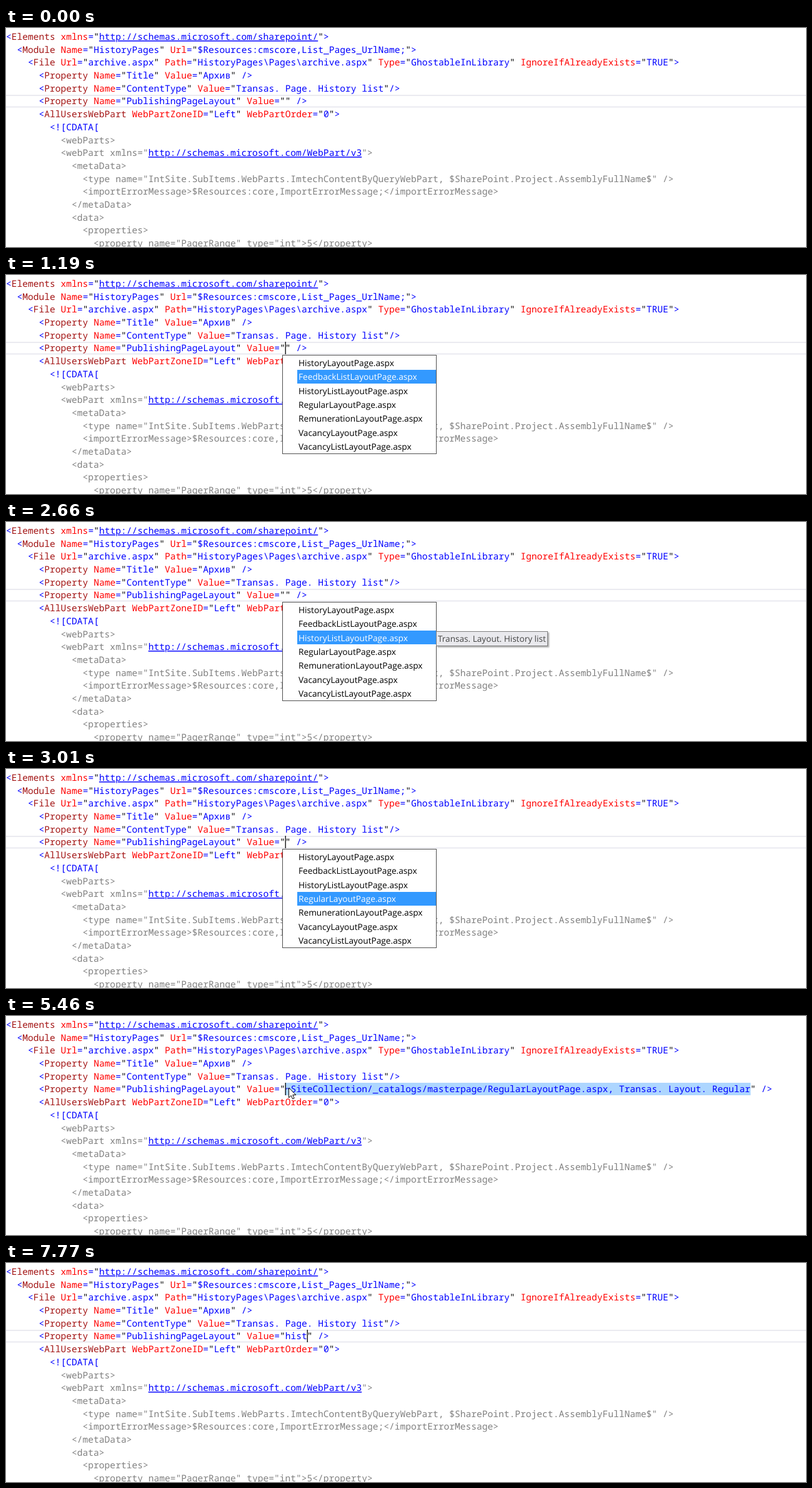
Write an HTML page that moves like this. It is 1280x351 px and loops after 8000 ms.

```html
<!DOCTYPE html>
<html lang="en">
<head>
<meta charset="utf-8">
<title>Layout completion</title>
<style>
  html, body { margin: 0; width: 100%; height: 100%; overflow: hidden; background: #fff; }
  svg { display: block; }
  text { white-space: pre; text-rendering: geometricPrecision; }
  #code { font: 14.6px "Noto Sans Mono", monospace; fill: #00f; }
  #popup, #tip { font: 13.7px "Open Sans", sans-serif; }
  #tip text { font-size: 13.6px; fill: #444; }
  #tip rect { fill: #e9e9ed; stroke: #808080; filter: drop-shadow(2px 2px 1px #0005); }
  .tag { fill: #a31515; }
  .attr { fill: #f00; }
  .quote { fill: #000; }
  .data { fill: #808080; }
  .link { fill: #00f; text-decoration: underline; text-decoration-thickness: 1.2px; text-underline-offset: 1.5px; }
</style>
</head>
<body>
<svg width="1280" height="351" viewBox="0 0 1280 351">
  <rect id="line" x="-5" y="108" width="1290" height="18.5" fill="none" stroke="#eaeaf0" stroke-width="2"/>
  <rect id="selection" y="107" height="20" fill="#add6ff"/>
  <g id="code"></g>
  <g id="popup">
    <rect x="442.5" y="128.5" width="246" height="158" fill="#fff" stroke="#505050"/>
    <rect id="mark" x="466" width="222" height="22" fill="#39f"/>
  </g>
  <g id="tip">
    <rect x="688.5" y="0.5" height="23"/>
    <text x="691" y="16.5"></text>
  </g>
  <rect id="caret" y="107" width="1.3" height="20"/>
  <path id="mouse" d="M0 0V16l3.7-3.5 2.4 5.4 2.6-1.1-2.4-5.3h5z" fill="#fff" stroke="#000"/>
</svg>
<script>
const CHAR = 8.76, LINE = 20.69, ROW = 22.3, LOOP = 8000, STEP = 70;
const FIRST = 51;   // column where the edited value begins
const $ = id => document.getElementById(id);

function add(parent, name, attrs, content = '') {
  const el = document.createElementNS('http://www.w3.org/2000/svg', name);
  set(el, attrs);
  el.textContent = content;
  return parent.appendChild(el);
}

function set(el, attrs) {
  for (const key in attrs) el.setAttribute(key, attrs[key]);
}

const code = String.raw`<Elements xmlns="http://schemas.microsoft.com/sharepoint/">
  <Module Name="HistoryPages" Url="$Resources:cmscore,List_Pages_UrlName;">
    <File Url="archive.aspx" Path="HistoryPages\Pages\archive.aspx" Type="GhostableInLibrary" IgnoreIfAlreadyExists="TRUE">
      <Property Name="Title" Value="Архив" />
      <Property Name="ContentType" Value="Transas. Page. History list"/>
      <Property Name="PublishingPageLayout" Value="" />
      <AllUsersWebPart WebPartZoneID="Left" WebPartOrder="0">
        <![CDATA[
          <webParts>
          <webPart xmlns="http://schemas.microsoft.com/WebPart/v3">
            <metaData>
              <type name="IntSite.SubItems.WebParts.ImtechContentByQueryWebPart, $SharePoint.Project.AssemblyFullName$" />
              <importErrorMessage>$Resources:core,ImportErrorMessage;</importErrorMessage>
            </metaData>
            <data>
              <properties>
                <property name="PagerRange" type="int">5</property>`.split('\n');

let field;
code.forEach((line, i) => {
  const text = add($('code'), 'text', { x: 0, y: 19 + i * LINE });
  const span = (cls, s) => add(text, 'tspan', { class: cls }, s);
  if (i > 7) {
    line.split(/(http[^"]+)/).forEach((s, k) => span(k % 2 ? 'link' : 'data', s));
    return;
  }
  // tag name, attribute name, quoted value, anything else
  const parts = /(?<=<)(\w+)|(\w+)(?==)|"([^"]*)"|[^"\w]+|\w+/g;
  for (const [all, tag, attr, value] of line.matchAll(parts)) {
    if (value !== undefined) {
      span('quote', '"');
      const el = span(value.startsWith('http') ? 'link' : '', value);
      if (!value) field = el;
      span('quote', '"');
    } else span(tag ? 'tag' : attr ? 'attr' : '', all);
  }
});

const items = ['History', 'FeedbackList', 'HistoryList', 'Regular', 'Remuneration', 'Vacancy', 'VacancyList']
  .map((name, i) => add($('popup'), 'text', { x: 468, y: 146 + i * ROW }, name + 'LayoutPage.aspx'));

const full = '~SiteCollection/_catalogs/masterpage/RegularLayoutPage.aspx, Transas. Layout. Regular';
const values = [[0, ''], [3290, full], [6370, ''], [7210, 'h'], [7420, 'hi'], [7560, 'his'], [7770, 'hist']];
const rows = [[0, -1], [350, 0], [1190, 1], [1330, 2], [1750, 1], [2170, 2], [3010, 3], [3290, -1]];
const blinks = [70, 490, 980, 1470, 1960, 2450, 2940, 3360, 3850, 4340, 4830, 5740, 6230, 6720, 7210];

const at = (keys, t) => keys.filter(k => k[0] <= t).pop()[1];
const show = (id, on) => $(id).setAttribute('visibility', on ? 'visible' : 'hidden');

function draw(t) {
  const value = at(values, t);
  if (field.textContent !== value) field.textContent = value;

  const row = at(rows, t);
  const rowTop = Math.round(129.7 + row * ROW);
  show('popup', row >= 0);
  set($('mark'), { y: rowTop });
  items.forEach((el, i) => el.setAttribute('fill', i === row ? '#fff' : '#000'));

  const tipOn = row === 0 ? t >= 840 : row === 2 && t >= 2590;
  show('tip', tipOn);
  if (tipOn) {
    const [box, label] = $('tip').children;
    label.textContent = 'Transas. Layout. History' + (row ? ' list' : '');
    set(box, { width: row ? 178 : 155 });
    set($('tip'), { transform: `translate(0 ${rowTop + 1})`, opacity: t >= 2590 && t < 2660 ? 0.5 : 1 });
  }

  // the value is dragged over from its end to its start
  const p = Math.min(1, Math.max(0, Math.floor((t - 4830) / STEP) / 9));
  const drag = p * p * (3 - 2 * p);
  const dragged = t >= 4830 && t < 6370;
  const end = FIRST + value.length;
  const col = dragged ? Math.round(end - drag * full.length) : end;
  show('line', !dragged);
  show('selection', dragged);
  set($('selection'), { x: col * CHAR, width: (end - col) * CHAR });

  show('caret', blinks.filter(b => b <= t).length % 2);
  set($('caret'), { x: col * CHAR - 0.2 });

  show('mouse', t >= 4340 && t < 6370);
  const x = t < 4410 ? 458 : 1179 - 726.5 * drag;
  set($('mouse'), { transform: `translate(${x} ${117.5 - 2.5 * drag})` });
}

function tick() {
  draw(performance.now() % LOOP);
  requestAnimationFrame(tick);
}
tick();
</script>
</body>
</html>
```
